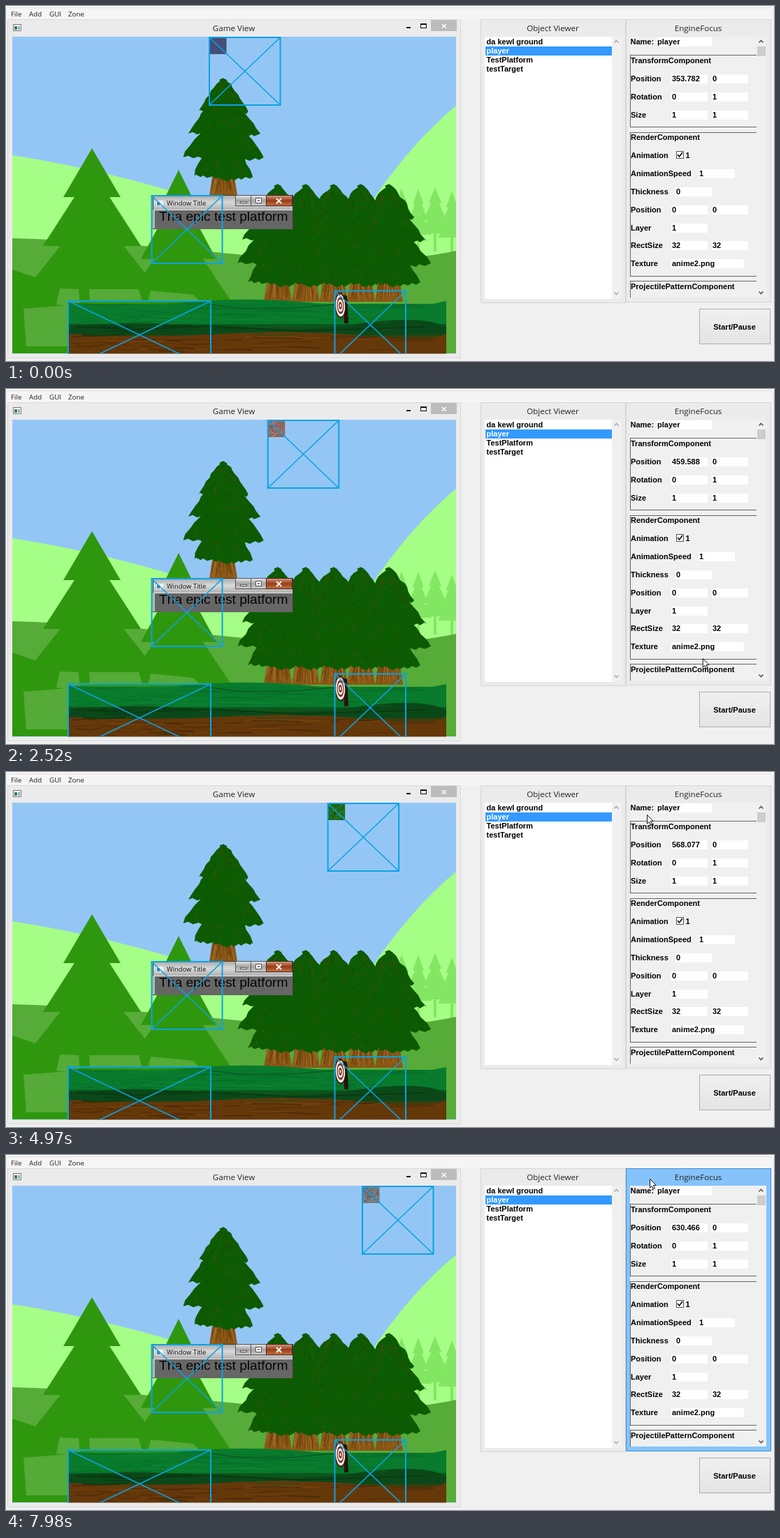
These frames come from a looping animation (1099x509 px, 8000 ms). An HTML page with a canvas:

```html
<!DOCTYPE html>
<html>
<head>
<meta charset="utf-8">
<style>
html, body { margin: 0; width: 100%; height: 100%; overflow: hidden; background: #f0f0f0; }
canvas { display: block; }
</style>
</head>
<body>
<canvas id="stage" width="1099" height="509"></canvas>
<script>
const stage = document.getElementById('stage');
const UI = '"Open Sans", sans-serif';
const BOLD = 'bold 11px "Liberation Sans", Arial, sans-serif';
const LINE = '#0ca2e4';
let ctx;

function seeded(seed) {
  return () => (seed = (seed * 16807) % 2147483647) / 2147483647;
}
function rect(x, y, w, h, fill, border) {
  ctx.fillStyle = fill;
  ctx.fillRect(x, y, w, h);
  if (border) {
    ctx.strokeStyle = border;
    ctx.lineWidth = 1;
    ctx.strokeRect(x + .5, y + .5, w - 1, h - 1);
  }
}
function text(str, x, y, font = BOLD, color = '#000', align = 'left') {
  ctx.font = font;
  ctx.fillStyle = color;
  ctx.textAlign = align;
  ctx.fillText(str, x, y);
}
function path(points, close) {
  ctx.beginPath();
  for (let i = 0; i < points.length; i += 2) ctx.lineTo(points[i], points[i + 1]);
  if (close) ctx.closePath();
}
function poly(color, ...points) {
  path(points, true);
  ctx.fillStyle = color;
  ctx.fill();
}
function line(color, width, ...points) {
  path(points);
  ctx.strokeStyle = color;
  ctx.lineWidth = width;
  ctx.stroke();
}
function shape(color, d) {
  ctx.fillStyle = color;
  ctx.fill(new Path2D(d));
}
function gradient(y0, y1, ...colors) {
  const g = ctx.createLinearGradient(0, y0, 0, y1);
  colors.forEach((c, i) => g.addColorStop(i / (colors.length - 1), c));
  return g;
}

// Flat background tree made of three stacked tiers
function silhouette(x, y, w, h, color) {
  for (const [top, bottom, half] of [[0, .34, .21], [.15, .68, .36], [.4, 1, .5]])
    poly(color, x, y + top * h, x + half * w, y + bottom * h, x - half * w, y + bottom * h);
}

// Brushed fir, 124 wide and 167 high
function fir(x, y, seed) {
  const rnd = seeded(seed);
  const spread = (a) => (rnd() - .5) * a;
  poly('#8a5716', x - 13, y + 122, x + 13, y + 122, x + 20, y + 167, x - 20, y + 167);
  for (let i = 0; i < 34; i++) {
    const dx = spread(34);
    line(i % 3 ? '#70430d' : '#a3702a', 1, x + dx * .6, y + 124 + rnd() * 15, x + dx, y + 150 + rnd() * 16);
  }
  const tiers = [[0, 46, 36], [22, 78, 52], [48, 112, 59], [72, 139, 43]];
  for (const [top, bottom, half] of tiers.reverse()) {
    const edge = [x, y + top];
    for (let i = 1; i <= 9; i++)
      edge.push(x + half * (i / 9) ** .9 + spread(4), y + top + (bottom - top) * (i / 9) ** 1.25);
    for (let i = 7; i > -8; i--)
      edge.push(x + half * i / 8 + spread(4), y + bottom + (1 - Math.abs(i / 8)) * 5 + (i % 2) * 3);
    for (let i = 9; i > 0; i--)
      edge.push(x - half * (i / 9) ** .9 + spread(4), y + top + (bottom - top) * (i / 9) ** 1.25);
    poly('#0c5b03', ...edge);
    for (let i = 0; i < 75; i++) {
      const v = .12 + rnd() * .8, dx = spread(2 * half * v), py = y + top + (bottom - top) * v;
      line(['#07680b', '#124b03', '#2d5007', '#086003', '#444c0b'][i % 5], 1,
        x + dx, py, x + dx * 1.07 + Math.sign(dx) * 3, py + 3 + rnd() * 5);
    }
  }
  line('#0c5b03', 3, x - 5, y + 2, x, y, x + 5, y + 3);
}

function ground() {
  const rnd = seeded(91);
  rect(89, 427, 541, 72, gradient(427, 498, '#087a2c', '#07682a', '#0b5219', '#5a3107', '#75410b'));
  shape('#087b2d', 'M89 425Q180 432 270 424T460 428T630 423V456H89Z');
  shape('#0b4819', 'M89 458Q200 452 300 461T500 456T630 461V472H89Z');
  shape('#65380a', 'M89 470Q190 477 310 470T520 474T630 469V498H89Z');
  for (let i = 0; i < 120; i++) {
    const x = 89 + rnd() * 460, y = 427 + rnd() * 69, w = 25 + rnd() * 56;
    const colors = y < 455 ? ['#0a6b2a', '#108538', '#066a22'] :
      y < 473 ? ['#06310f', '#17511a', '#0a4315'] : ['#522b06', '#7b4610', '#3d2407'];
    ctx.globalAlpha = .6;
    line(colors[i % 3], .7 + rnd() * 1.4, x, y, x + w / 2, y + rnd() * 4 - 2, Math.min(630, x + w), y + rnd() * 5 - 2);
  }
  ctx.globalAlpha = 1;
  line('#0a4d20', 1, 290, 428, 340, 434, 400, 434, 470, 428);
  line('#093a10', 2, 100, 460, 180, 464, 290, 459, 420, 466, 600, 460);
}

function platform() {
  rect(210, 271, 201, 49, gradient(271, 292, '#a7a7a7', '#d8d8d8', '#b2b2b2'), '#3b3f3b');
  rect(213, 293, 197, 27, '#666');
  line('#e7e7e7', 1, 211, 319, 211, 292.5, 410, 292.5);
  rect(215, 279, 10, 8, '#e9f2f7');
  rect(216, 281, 4, 5, '#447fa8');
  text('Window Title', 230, 286, '9.4px ' + UI, '#111');
  rect(328, 271, 23, 16, gradient(271, 287, '#eee', '#a3a3a3', '#d0d0d0'), '#555');
  rect(350, 271, 23, 16, gradient(271, 287, '#eee', '#a3a3a3', '#d0d0d0'), '#555');
  rect(372, 271, 38, 16, gradient(271, 287, '#d0a48c', '#9b3b18', '#c27945'), '#522');
  rect(335, 280, 10, 3, '#fff', '#555');
  rect(357, 275, 9, 8, '#fff', '#555');
  rect(360, 278, 3, 2, '#777');
  line('#fff', 2, 387, 276, 394, 283);
  line('#fff', 2, 394, 276, 387, 283);
  text('Tha epic test platform', 219, 308, '19.2px "Liberation Sans", Arial, sans-serif', '#050505');
}

function target() {
  poly('#28130a', 483, 414, 488, 416, 490, 455, 484, 455);
  [['#3c1510', 8, 18], ['#f2eee8', 6.7, 16], ['#7a3022', 5, 12], ['#f2eee8', 3.8, 9], ['#7a3022', 2.4, 5.5], ['#eee', 1, 2.5]]
    .forEach(([color, rx, ry]) => {
      ctx.beginPath();
      ctx.ellipse(478.5, 429.5, rx, ry, -.05, 0, 7);
      ctx.fillStyle = color;
      ctx.fill();
    });
}

function crossBox(x, y, w, h) {
  ctx.strokeStyle = LINE;
  ctx.lineWidth = 2;
  ctx.strokeRect(x, y, w, h);
  line(LINE, 1.6, x, y, x + w, y + h);
  line(LINE, 1.6, x + w, y, x, y + h);
}

function clipGame() {
  ctx.save();
  ctx.beginPath();
  ctx.rect(9, 44, 635, 454.5);
  ctx.clip();
}

function scene() {
  clipGame();
  rect(9, 44, 635, 455, '#94c6f5');
  shape('#a5ff86', 'M9 214Q150 236 290 282L520 285Q580 196 644 143V498H9Z');
  for (const [x, y, w] of [[566, 262, 42], [590, 262, 38], [614, 260, 44], [638, 266, 40]]) {
    silhouette(x, y, w, 66, '#83e663');
    rect(x - 2, y + 64, 4, 28, '#83e663');
  }
  shape('#57ab38', 'M9 333Q130 336 330 356T644 351V498H9Z');
  silhouette(123, 204, 195, 206, '#2f970e');
  silhouette(247, 235, 150, 188, '#2f970e');
  shape('#2f970e', 'M9 378L60 395L322 423V498H9Z');
  poly('#55aa38', 77, 405, 104, 406, 106, 432, 72, 428);
  poly('#55aa38', 119, 406, 190, 406, 195, 424, 120, 424);
  poly('#55aa38', 207, 408, 268, 414, 277, 424, 203, 424);
  poly('#55aa38', 25, 434, 89, 429, 89, 488, 29, 488);
  fir(311, 105, 17);
  [389, 429, 469, 508, 548].forEach((x, i) => fir(x, 257, 40 + i * 7));
  ground();
  target();
  platform();
  crossBox(208.5, 272, 101, 97);
  crossBox(89, 423, 204, 97);
  crossBox(470.5, 408.5, 101.5, 97);
  ctx.restore();
}

function chevron(x, y, dir, color) {
  line(color, 1.6, x - 3, y + dir * 1.5, x, y - dir * 1.5, x + 3, y + dir * 1.5);
}
function title(str, x) {
  text(str, x, 36, '11.6px ' + UI, '#222', 'center');
}

function windows() {
  rect(0, 0, 1099, 509, '#f0f0f0');
  rect(0, 0, 1099, 3, '#fbfbfb');
  rect(1, 2, 1095, 1, '#dedede');
  rect(1, 3, 1095, 16, '#f5f5f5');
  [['File', 7], ['Add', 33], ['GUI', 62], ['Zone', 89]].forEach(([s, x]) => text(s, x, 15, '9.8px ' + UI, '#222'));

  rect(2, 19, 649, 486, '#ebebeb', '#dadada');
  title('Game View', 326);
  rect(10, 26, 12, 10, '#fff', '#777');
  rect(12, 29, 4, 5, '#397c62');
  rect(17, 29, 3, 5, '#90a9bd');
  rect(573, 30, 6, 2, '#111');
  rect(593, 25, 9, 7, '#ebebeb', '#111');
  rect(593, 25, 9, 2, '#111');
  rect(608, 20, 37, 16, '#bcbcbc');
  line('#fff', 1.5, 624, 26, 630, 31.5);
  line('#fff', 1.5, 630, 26, 624, 31.5);
  scene();

  rect(679, 19, 208, 407, '#ebebeb', '#d6d6d6');
  title('Object Viewer', 782.5);
  rect(685, 44, 196, 376, '#fff');
  rect(867, 44, 14, 376, '#f0f0f0');
  chevron(873.5, 51, 1, '#aaa');
  chevron(873.5, 412, -1, '#aaa');
  rect(686, 58, 181, 13, '#3399ff');
  ['da kewl ground', 'player', 'TestPlatform', 'testTarget']
    .forEach((s, i) => text(s, 687.5, 55 + i * 13, BOLD, i == 1 ? '#fff' : '#000'));

  rect(992, 434, 102, 51, gradient(434, 485, '#f0f0f0', '#e4e4e4'), '#acacac');
  text('Start/Pause', 1042.5, 464, BOLD, '#000', 'center');
}

function field(value, x, y, w = 52) {
  rect(x, y - 10, w, 13, '#fff');
  text(value, x + 1, y);
}

function focusPanel(position, active) {
  rect(887, 19, 208, 406, active ? '#85c3fa' : '#ebebeb', active ? '#3b8fd8' : '#d6d6d6');
  title('EngineFocus', 990.5);
  rect(893, 44, 195, 374, '#f0f0f0');
  ctx.save();
  ctx.beginPath();
  ctx.rect(893, 44, 181, 374);
  ctx.clip();
  for (const [y, h] of [[70, 104], [181, 207], [394, 80]]) rect(893, y, 190, h, '#f0f0f0', '#666');
  text('Name:', 893.5, 55);
  field('player', 931, 55, 79);
  const row = (y, label, a, b, x = 952, w) => {
    text(label, 894, y);
    if (a) field(a, x, y, w);
    if (b) field(b, 1010, y);
  };
  row(82, 'TransformComponent');
  row(108, 'Position', position, '0');
  row(134, 'Rotation', '0', '1');
  row(160, 'Size', '1', '1');
  row(192, 'RenderComponent');
  row(218, 'Animation');
  rect(959, 208, 11, 11, '#fff', '#555');
  line('#111', 1.7, 961, 213, 963.5, 216, 968, 210);
  text('1', 972.5, 218);
  row(244, 'AnimationSpeed', '1', '', 991);
  row(270, 'Thickness', '0', '', 958);
  row(296, 'Position', '0', '0');
  row(322, 'Layer', '1');
  row(347, 'RectSize', '32', '32');
  row(373, 'Texture', 'anime2.png', '', 952, 104);
  row(406, 'ProjectilePatternComponent');
  ctx.restore();
  chevron(1080.5, 51, 1, '#555');
  chevron(1080.5, 411, -1, '#555');
  rect(1075, 58, 12, 14, '#cdcdcd');
}

// Piecewise linear value; each key is [time, ...values]
function track(keys, t) {
  let i = 0;
  while (i < keys.length - 2 && t >= keys[i + 1][0]) i++;
  const [a, b] = [keys[i], keys[i + 1]];
  const k = Math.min(1, Math.max(0, (t - a[0]) / (b[0] - a[0])));
  return a.slice(1).map((v, j) => v + (b[j + 1] - v) * k);
}

const walk = [[0, 353.782], [623, 353.782], [1750, 416.645], [3220, 498.628], [4466, 568.077], [5600, 568.077],
  [6090, 582.214], [6440, 595.1], [6860, 605.071], [7280, 615.2], [7560, 619.4], [7630, 619.4], [7980, 630.466]];
const pointer = [[2310, 1004, 469], [2450, 1004, 469], [2730, 975, 137], [3080, 972, 38], [3640, 972, 38],
  [4340, 917, 61], [5180, 917, 61], [5390, 921, 34]];
const tiles = ['#454d78', '#176b12', '#2c6e26', '#77766f', '#77777a', '#93665f', '#93665f', '#91645d', '#644b45', '#5e504a'];

function player(x, step) {
  const index = step % tiles.length;
  const rnd = seeded(300 + index * 31);
  clipGame();
  rect(x, 45, 24.5, 24, tiles[index]);
  if (index) for (let i = 0; i < 90; i++) {
    const px = x + rnd() * 22, py = 46 + rnd() * 21;
    rect(px, py, 2, 2, rnd() < .5 ? 'rgba(0,0,0,.13)' : 'rgba(255,255,255,.1)');
  }
  crossBox(x, 45, 101.5, 97);
  ctx.restore();
}

function cursor(x, y) {
  ctx.save();
  ctx.translate(x, y);
  path([.5, .5, .5, 13, 3.2, 10.5, 5.3, 15, 7.4, 14, 5.3, 9.6, 9, 9.3], true);
  ctx.fillStyle = '#fff';
  ctx.fill();
  ctx.strokeStyle = '#111';
  ctx.lineWidth = 1;
  ctx.stroke();
  ctx.restore();
}

const backdrop = document.createElement('canvas');
backdrop.width = stage.width;
backdrop.height = stage.height;
ctx = backdrop.getContext('2d');
windows();
ctx = stage.getContext('2d');

function draw() {
  const step = Math.floor(performance.now() % 8000 / 70);
  const t = step * 70;
  const [position] = track(walk, t);
  ctx.drawImage(backdrop, 0, 0);
  player(291 + (position - 353.782) * .7915, step);
  focusPanel(position.toFixed(3), t >= 5390);
  if (t >= 2310) cursor(...track(pointer, t));
  requestAnimationFrame(draw);
}
draw();
</script>
</body>
</html>
```
